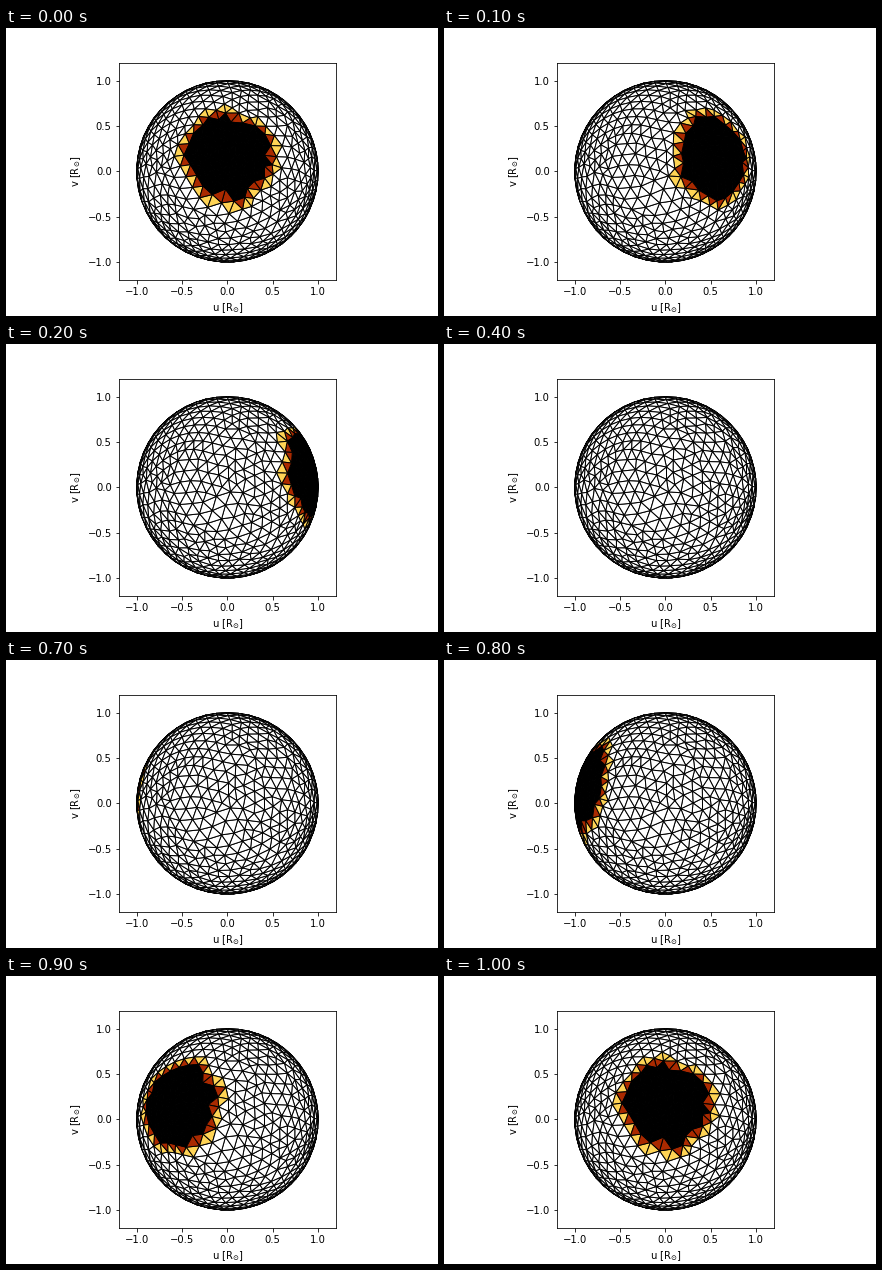
These frames come from a looping animation (432 px wide and 288 px high, 1.1 s). A matplotlib script:

```python
import matplotlib.pyplot as plt
import numpy as np
from matplotlib.animation import FuncAnimation
from matplotlib.collections import PolyCollection
from matplotlib.tri import Triangulation

N_FRAMES = 11
TARGET_TRIANGLES = 1500
SPOT_RADIUS = np.radians(30)
SPOT_LATITUDE = np.radians(10)


def unit(v):
    return v / np.linalg.norm(v)


def bearing(p, start, end):
    """Angle around p on the sphere, counter-clockwise from start to end."""
    t = start - (p * start).sum(-1, keepdims=True) * p
    y = (np.cross(p, t) * end).sum(-1)
    return np.arctan2(y, (t * end).sum(-1)) % (2 * np.pi)


def find_bridge(ring, before, omega, delta):
    """Closest pair of front points that face each other across a narrow gap."""
    n = len(ring)
    dist = np.linalg.norm(ring[:, None] - ring[None], axis=2)
    i, j = np.triu_indices(n, 3)
    near = (dist[i, j] < delta) & (n - (j - i) >= 3)
    pairs = sorted(zip(i[near], j[near]), key=lambda ij: dist[ij])
    for a, b in pairs:
        if (bearing(ring[a], before[a], ring[b]) < omega[a]
                and bearing(ring[b], before[b], ring[a]) < omega[b]):
            return a, b
    return None


def march(delta):
    """Cover the unit sphere with points by advancing a front from the pole."""
    pole = np.array([0.0, 1.0, 0.0])
    points = [pole]
    for a in np.arange(6) * np.pi / 3:
        step = np.array([-np.sin(a), 0, -np.cos(a)])
        points.append(unit(pole + delta * step))
    fronts = [[1, 2, 3, 4, 5, 6]]

    while fronts and len(points) < 1000:
        front = fronts.pop()
        if len(front) < 4:
            continue
        ring = np.array([points[k] for k in front])
        before, after = np.roll(ring, 1, axis=0), np.roll(ring, -1, axis=0)
        omega = bearing(ring, before, after)

        bridge = find_bridge(ring, before, omega, delta)
        if bridge:
            a, b = bridge
            fronts += [front[a:b + 1], front[:a + 1] + front[b:]]
            continue

        k = int(np.argmin(np.round(omega, 9)))
        p, p1, p2, angle = ring[k], before[k], after[k], omega[k]
        count = int(angle * 3 / np.pi) + 1
        if count > 1 and angle / count < 0.8:
            count -= 1
        if count == 1 and angle > 0.8 and np.linalg.norm(p1 - p2) > 1.2 * delta:
            count = 2
        shortest = min(np.linalg.norm(p1 - p), np.linalg.norm(p2 - p))
        if angle < 3 and shortest <= 0.5 * delta:
            count = 1

        d1 = unit(p1 - (p1 @ p) * p)
        d2 = np.cross(p, d1)
        fresh = []
        for a in angle / count * np.arange(1, count):
            fresh.append(len(points))
            points.append(unit(p + delta * (np.cos(a) * d1 + np.sin(a) * d2)))
        fronts.append(front[:k] + fresh + front[k + 1:])

    kept = []
    for p in points:
        if all(np.linalg.norm(p - q) > 0.5 * delta for q in kept):
            kept.append(p)
    return np.array(kept)


def sphere_triangles(points):
    """Delaunay on the sphere, through a stereographic view from one vertex."""
    hub = int(np.argmin(points[:, 2]))
    others = np.delete(np.arange(len(points)), hub)
    h, rest = points[hub], points[others]
    e1 = unit(np.cross(h, [0, 1, 0]))
    e2 = np.cross(h, e1)
    scale = 1 - rest @ h
    plane = Triangulation(rest @ e1 / scale, rest @ e2 / scale)
    tri = plane.triangles
    fan = [[others[tri[t, s]], others[tri[t, (s + 1) % 3]], hub]
           for t, s in np.argwhere(plane.neighbors < 0)]
    return np.vstack([others[tri], fan])


def mesh_area(corners):
    a, b, c = corners.transpose(1, 0, 2)
    return np.linalg.norm(np.cross(b - a, c - a), axis=1).sum() / 2


delta = np.sqrt(4 / np.sqrt(3) * 4 * np.pi / TARGET_TRIANGLES)
points = march(delta)
triangles = sphere_triangles(points)
# Painter's order: far triangles first.
triangles = triangles[np.argsort(points[triangles, 2].mean(axis=1))]
# Flat facets lie inside the sphere; enlarge them to keep its surface area.
corners = points[triangles]
corners = corners * np.sqrt(4 * np.pi / mesh_area(corners))

plt.rcParams.update({"font.family": "DejaVu Sans", "font.size": 10})
fig, ax = plt.subplots(figsize=(6, 4), dpi=72)
fig.subplots_adjust(left=0.125, right=0.9, bottom=0.125, top=0.88)
ax.set_aspect("equal")
ax.set(xlim=(-1.2, 1.2), ylim=(-1.2, 1.2))
ticks = np.arange(-1, 1.1, 0.5)
ax.set_xticks(ticks)
ax.set_yticks(ticks)
ax.set_xlabel(r"u [$\mathrm{R_{\odot}}$]")
ax.set_ylabel(r"v [$\mathrm{R_{\odot}}$]")

star = PolyCollection(corners[:, :, :2], edgecolors="black",
                      facecolors="white", linewidths=1)
ax.add_collection(star)
heat = plt.get_cmap("afmhot")


def update(frame):
    longitude = 2 * np.pi * frame / (N_FRAMES - 1)
    spot = np.array([np.cos(SPOT_LATITUDE) * np.sin(longitude),
                     np.sin(SPOT_LATITUDE),
                     np.cos(SPOT_LATITUDE) * np.cos(longitude)])
    cool = points @ spot > np.cos(SPOT_RADIUS)
    star.set_facecolor(heat(1 - cool[triangles].mean(axis=1)))
    return [star]


anim = FuncAnimation(fig, update, frames=N_FRAMES, interval=100,
                     repeat=True, repeat_delay=0)
plt.show()
```
